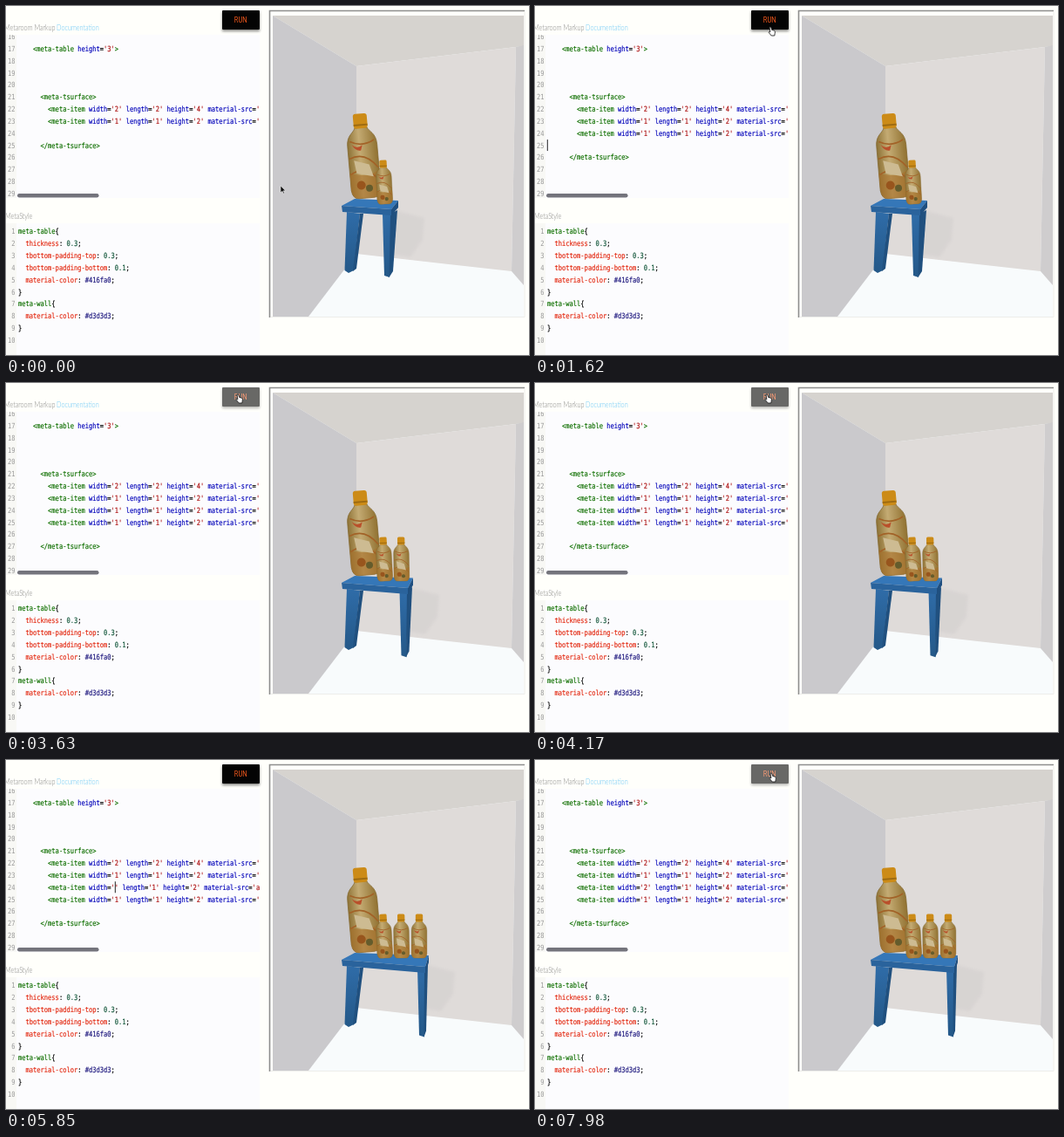
Recreate the animation shown at these times as an HTML page. Size 600 by 400 pixels, loop 8 s.

```html
<!DOCTYPE html>
<html lang="en">
<head>
<meta charset="utf-8">
<title>Markup room editor</title>
<style>
  html, body { margin: 0; width: 100%; height: 100%; overflow: hidden; background: #fffffb; }
  svg { display: block; width: 600px; height: 400px; }
  text { white-space: pre; }
  .code { font: 8.5px "DejaVu Sans Mono", monospace; stroke-width: .2; stroke: #000; }
  .label { font: 300 8.7px Lato, sans-serif; fill: #808080; }
  .label .link { fill: #5fc3f5; }
  .num { fill: #999; stroke: none; text-anchor: end; }
  .tag { fill: #107000; stroke: #107000; }
  .attr { fill: #0808bb; stroke: #0808bb; }
  .str { fill: #b01818; stroke: #b01818; }
  .prop { fill: #e32a12; stroke: #e32a12; }
  .val { fill: #15583c; stroke: #15583c; }
  .hex { fill: #221c80; stroke: #221c80; }
</style>
</head>
<body>
<svg viewBox="0 0 600 400">
  <defs>
    <clipPath id="pane"><path d="M0 33H291V220H0zM0 249H291V400H0z"/></clipPath>
    <linearGradient id="glass">
      <stop offset="0" stop-color="#8d7236"/><stop offset=".4" stop-color="#c4ab73"/>
      <stop offset="1" stop-color="#917232"/>
    </linearGradient>
    <linearGradient id="legPaint" x2="0" y2="1">
      <stop offset="0" stop-color="#2f6ca8"/><stop offset="1" stop-color="#245888"/>
    </linearGradient>
    <filter id="blur"><feGaussianBlur stdDeviation="1.6"/></filter>
    <!-- origin at the middle of the base -->
    <g id="bottle">
      <path d="M-7-81C-9-75-17-74-17-60L-17-10Q-16 0-9 0H9Q16 0 17-10L17-60C17-74 9-75 7-81z" fill="url(#glass)" stroke="#80652c" stroke-width=".7"/>
      <path d="M-17-30Q0-22 17-31V-10Q16 0 9 0H-9Q-16 0-17-10z" fill="#a8712a" opacity=".6"/>
      <path d="M-14-66Q0-58 14-66M-16-46Q2-54 16-34M-16-28Q0-38 16-20" fill="none" stroke="#a26227" stroke-width="1.6"/>
      <path d="M-12-62Q-6-56 0-61L-2-55Q-8-54-12-62z" fill="#b9502b"/>
      <path d="M-11-44L6-38 10-24-9-29z" fill="#cdbb92"/>
      <circle cx="-5" cy="-15" r="5" fill="#98551d"/>
      <circle cx="4" cy="-11" r="4" fill="#645c2c"/>
      <rect x="-8" y="-97" width="16" height="17" rx="3" fill="#cc8b17"/>
      <path d="M-8-84H8" stroke="#9c6a12" stroke-width="2"/>
    </g>
  </defs>

  <rect width="600" height="400" fill="#fffffb"/>
  <path d="M12 33H291V220H12zM12 249H291V400H12z" fill="#fcfcfe"/>
  <path d="M0 33H12V220H0zM0 249H12V400H0z" fill="#f8f8f5"/>
  <g clip-path="url(#pane)">
    <g id="markup" class="code"></g>
    <g id="style" class="code"></g>
    <path id="caret" stroke="#222" stroke-width="1"/>
  </g>
  <rect x="13" y="215" width="93.5" height="4.4" rx="2.2" fill="#74747c"/>
  <g class="label">
    <text transform="translate(-2 27.6) scale(.834 1)">Metaroom Markup</text>
    <text class="link" transform="translate(58 27.6) scale(.834 1)">Documentation</text>
    <text transform="translate(-1 244) scale(.834 1)">MetaStyle</text>
  </g>
  <g id="run">
    <rect x="248" y="7" width="43" height="22" fill="#000" opacity=".45" filter="url(#blur)"/>
    <rect x="248" y="5" width="43" height="22" rx="1" fill="#040404"/>
    <text transform="translate(269.2 19.2) scale(.834 1)" text-anchor="middle" font-family="Roboto, sans-serif" font-size="9" fill="#f2581c">RUN</text>
  </g>

  <path d="M302.5 357V5.5H595" fill="none" stroke="#8e8e8e" stroke-width="1.6"/>
  <path d="M304 356.5H595V7" fill="none" stroke="#ededea"/>
  <rect x="306" y="11" width="288" height="345" fill="#f8fbfc"/>
  <path d="M306 11H594V46L585 47 402 69z" fill="#d6d3cf"/>
  <path d="M306 11L402 69V284L347 356H306z" fill="#cac9cc"/>
  <path d="M402 69L585 47 580 304 402 284z" fill="#dfdbd9"/>
  <path d="M585 47L594 45V320L580 304z" fill="#cfcdce"/>
  <path id="shadow" fill="#cbc8c7" opacity=".35" filter="url(#blur)"/>
  <g id="stool"></g>
  <g id="bottles">
    <use href="#bottle" transform="translate(414 220) rotate(-5)"/>
    <use href="#bottle" transform="translate(435 227) rotate(-3) scale(.52)"/>
    <use href="#bottle" transform="translate(454 227) rotate(-1) scale(.52)"/>
    <use href="#bottle" transform="translate(474 227) scale(.52)"/>
  </g>

  <g id="mouse" stroke-linejoin="round">
    <path id="arrow" d="M0 0V8L2 6.2 3.3 9 4.4 8.5 3.2 5.8H5.6z" fill="#111" stroke="#fff" stroke-width=".5"/>
    <path id="beam" d="M-2-4.5Q0-4.5 0-3Q0-4.5 2-4.5M0-3V4M-2 5.5Q0 5.5 0 4Q0 5.5 2 5.5M-1 1.5H1" fill="none" stroke="#333" stroke-width=".8"/>
    <path id="hand" d="M0 .5Q1-.6 1.8.6L2.6 3.4 5.6 4.2Q6.8 5 6.2 7.5L5.8 10H2.2L-.8 6.4Q-1 5.2 .9 5.8z" fill="#fff" stroke="#222" stroke-width=".9"/>
  </g>
</svg>
<script>
const LOOP = 8000, ADVANCE = 4.27, LEFT = 14, PITCH = 13.82;
const el = id => document.getElementById(id);
const span = (kind, s) => `<tspan class="${kind}">${s.replace(/</g, '&lt;')}</tspan>`;
const lineY = n => 38.2 + (n - 16) * PITCH;

const row = (x, y, body, kind = '') =>
  `<text class="${kind}" transform="translate(${x} ${y}) scale(.834 1)">${body}</text>`;

// Tag names, attributes and quoted values each get their own colour.
const paintTag = s => s.replace(/(<\/?[\w-]+|>)|([\w-]+)(?==)|('[^']*'?)/g, (m, tag, attr) =>
  span(tag ? 'tag' : attr ? 'attr' : 'str', m));

const paintRule = s => {
  const [, name, value] = s.match(/^ +([\w-]+): (.*);/) || [];
  return name ? '  ' + span('prop', name) + ': ' + span(value[0] === '#' ? 'hex' : 'val', value) + ';'
              : s.replace(/^[\w-]+/, m => span('tag', m));
};

const item = (width, length, height) =>
  `        <meta-item width='${width}' length='${length}' height='${height}' material-src='a`;

function drawMarkup(count, width, height) {
  const lines = { 17: "    <meta-table height='3'>", 21: '      <meta-tsurface>', 22: item(2, 2, 4) };
  for (let i = 1; i < count; i++)
    lines[22 + i] = i === 2 ? item(width, 1, height) : item(1, 1, 2);
  lines[23 + count] = '      </meta-tsurface>';
  let out = '';
  for (let n = 16; n <= 29; n++)
    out += row(10.5, lineY(n), n, 'num') + row(LEFT, lineY(n), paintTag(lines[n] || ''));
  el('markup').innerHTML = out;
}

el('style').innerHTML = `meta-table{
  thickness: 0.3;
  tbottom-padding-top: 0.3;
  tbottom-padding-bottom: 0.1;
  material-color: #416fa0;
}
meta-wall{
  material-color: #d3d3d3;
}
`.split('\n').map((s, i) =>
  row(10.5, 261 + i * 13.9, i + 1, 'num') + row(LEFT, 261 + i * 13.9, paintRule(s))).join('');

// The stool grows to the right with every extra small bottle.
function drawRoom(extra) {
  const right = 450 + [0, 17, 35][extra], back = 223 + extra / 2;
  const corner = right - 8 + extra * 2, front = 233 + extra * 2;
  const foot = right - 16 + extra * 2.5, floor = 311 + extra * 3.3;
  const poly = (fill, d) => `<path fill="${fill}" d="${d}"/>`;
  el('stool').innerHTML =
    poly('url(#legPaint)', 'M391 236L406 238 399 303 393 306 388.5 303z') +
    poly('#20507f', 'M406 238L410 238 402 301 398 304z') +
    poly('url(#legPaint)', `M${foot - 2} 238H${corner} L${foot + 6} ${floor} ${foot} ${floor - 2}z`) +
    poly('#20507f', `M${corner - 1} 238L${right - 1} 234 ${foot + 10 - extra} ${floor - 7} ${foot + 5.5} ${floor}z`) +
    poly('#3577b8', `M385 229L400 221 ${right} ${back} ${corner} ${front}z`) +
    poly('#2a639c', `M385 229L${corner} ${front}V${front + 7}L386 236z`) +
    poly('#1f4f80', `M${right} ${back}V${back + 8}L${corner} ${front + 7}V${front}z`);
  el('shadow').setAttribute('d', `M${right - 4} 234L${right + 30} 243 ${right + 28} 268 ${right + 14} 288 ${right - 4} 285z`);
  [...el('bottles').children].forEach((b, i) => b.style.display = i < extra + 2 ? '' : 'none');
}

// time, x, y, pointer shape from here on
const pointer = [
  [0, 315, 206, 'arrow'], [150, 315, 206, 'arrow'], [330, 285, 190, 'beam'], [680, 40, 147, 'beam'],
  [1150, 40, 147, 'beam'], [1500, 262, 33, 'hand'], [1620, 269, 24, 'hand'], [1760, 267, 16, 'hand'],
  [2080, 267, 16, 'hand'], [2430, 85, 140, 'beam'], [2580, 57, 155, 'beam'], [2720, 38, 159, 'beam'],
  [2920, 38, 159, 'beam'], [3260, 258, 22, 'hand'], [3450, 265, 13, 'hand'], [4200, 265, 13, 'hand'],
  [4700, 142, 138, 'hand'], [4950, 128, 147, 'hand'], [5100, 128, 147, 'beam'], [5450, 128, 147, ''],
  [6200, 128, 147, 'beam'], [6560, 223, 147, 'beam'], [6720, 223, 147, ''], [7150, 223, 147, 'beam'],
  [7550, 264, 24, 'hand'], [7750, 270, 15, 'hand'], [8000, 270, 15, 'hand']
];

// time, line, column; line 0 hides the caret
const carets = [
  [0, 0, 0], [700, 24, 0], [1150, 25, 0], [2430, 0, 0], [2740, 25, 0], [2880, 26, 0], [3500, 0, 0],
  [5250, 24, 27], [5550, 24, 26], [6050, 24, 27], [6600, 24, 49], [6770, 24, 48], [6980, 24, 49], [7700, 0, 0]
];

// start and end of each dimmed spell of the button
const dimmed = [[1640, 2430], [3300, 5100], [7600, 9000]];

const latest = (list, t) => list.filter(k => k[0] <= t).pop();
const clamp = v => Math.max(0, Math.min(1, v));
let shownText, shownRoom;

function draw(t) {
  const count = t < 1150 ? 2 : t < 2880 ? 3 : 4;
  const width = t < 5550 ? '1' : t < 6050 ? '' : '2';
  const height = t < 6770 ? '2' : t < 6980 ? '' : '4';
  const text = [count, width, height].join();
  if (text !== shownText) drawMarkup(count, width, height);
  shownText = text;

  const extra = t < 2430 ? 0 : t < 5100 ? 1 : 2;
  if (extra !== shownRoom) drawRoom(extra);
  shownRoom = extra;

  const [since, line, column] = latest(carets, t);
  const lit = line && (t - since) % 1060 < 530;
  el('caret').setAttribute('d', lit ? `M${LEFT + column * ADVANCE + .3} ${lineY(line) - 9.5}v13` : '');

  const dim = Math.max(...dimmed.map(([a, b]) => Math.min(clamp((t - a) / 250), 1 - clamp((t - b) / 160))));
  el('run').setAttribute('opacity', 1 - .4 * dim);

  const from = latest(pointer, t), to = pointer[pointer.indexOf(from) + 1] || from;
  const p = clamp((t - from[0]) / (to[0] - from[0] || 1)), e = p * p * (3 - 2 * p);
  const at = i => from[i] + (to[i] - from[i]) * e;
  el('mouse').setAttribute('transform', `translate(${at(1)} ${at(2)})`);
  for (const shape of ['arrow', 'beam', 'hand'])
    el(shape).style.display = shape === from[3] ? '' : 'none';
}

const start = performance.now();
function tick() {
  draw((performance.now() - start) % LOOP);
  requestAnimationFrame(tick);
}
tick();
</script>
</body>
</html>
```
